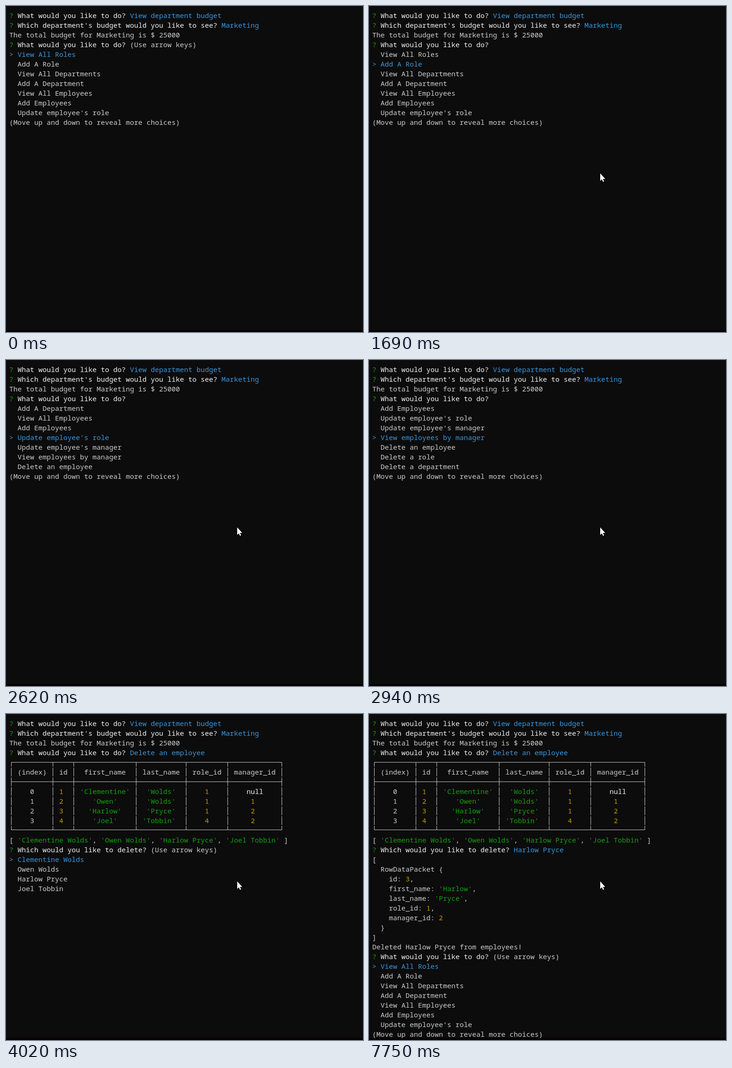
Recreate the animation shown at these times as an HTML page. Size 772 by 705 pixels, loop 8 s.

```html
<!DOCTYPE html>
<html lang="en">
<head>
<meta charset="utf-8">
<title>Terminal menu</title>
<style>
  html, body { margin: 0; width: 100%; height: 100%; overflow: hidden; background: #0c0c0c; }
  #stage { position: relative; width: 772px; height: 705px; overflow: hidden; background: #0c0c0c; }
  #stage::after { content: ""; position: absolute; left: 0; top: 701px; width: 100%; height: 4px; background: #050102; }
  pre { position: absolute; left: 7px; top: 10px; margin: 0; color: #ccc;
        font: 15px/21px "Noto Sans Mono", "DejaVu Sans Mono", monospace; font-variant-ligatures: none; }
  i { font-style: normal; }
  .w { color: #f2f2f2; } .g { color: #13a10e; } .b { color: #3a96dd; } .y { color: #c19c00; }
  svg { position: absolute; left: 0; top: 0; }
</style>
</head>
<body>
<div id="stage">
  <pre id="text"></pre>
  <svg width="772" height="705">
    <path id="grid" fill="none" stroke="#ccc"/>
    <path id="mouse" fill="#fff" d="M0 0V16.2L3.6 12.8L6 18.2L8.3 17.2L5.9 12H10.8Z"/>
  </svg>
</div>
<script>
const LOOP = 8000;
const $ = id => document.getElementById(id);
const paint = cls => s => `<i class="${cls}">${s}</i>`;
const white = paint('w'), green = paint('g'), blue = paint('b'), gold = paint('y');
const quote = s => green(`'${s}'`);

const MENU = ['View All Roles', 'Add A Role', 'View All Departments', 'Add A Department',
  'View All Employees', 'Add Employees', "Update employee's role", "Update employee's manager",
  'View employees by manager', 'Delete an employee', 'Delete a role', 'Delete a department',
  'View department budget'];
const STAFF = [['Clementine', 'Wolds', 1, null], ['Owen', 'Wolds', 1, 1],
  ['Harlow', 'Pryce', 1, 2], ['Joel', 'Tobbin', 4, 2]];
const NAMES = STAFF.map(p => p[0] + ' ' + p[1]);
const WIDTHS = [9, 4, 14, 11, 9, 12];

const ask = (q, answer = '') => `${green('?')} ${white(q)} ${answer}`;
const HINT = '(Use arrow keys)';
const TODO = 'What would you like to do?', WHICH = 'Which would you like to delete?';

const list = (items, sel) => items.map((s, i) => i === sel ? blue('&gt; ' + s) : '  ' + s);
const menu = sel => {
  const top = Math.max(0, sel - 3);
  return [...list(MENU.slice(top, top + 7), sel - top), '(Move up and down to reveal more choices)'];
};

// Table text; the rules are drawn as a path
const centre = (s, width, color) => {
  const gap = width - s.length, left = gap >> 1;
  return ' '.repeat(left) + color(s) + ' '.repeat(gap - left);
};
const plain = s => s;
const row = (cells, colors) =>
  ' ' + cells.map((s, i) => centre(s, WIDTHS[i], colors[i])).join(' ');
const table = [
  '',
  row(['(index)', 'id', 'first_name', 'last_name', 'role_id', 'manager_id'], WIDTHS.map(() => plain)),
  '',
  ...STAFF.map(([first, last, role, boss], i) => row(
    [`${i}`, `${i + 1}`, `'${first}'`, `'${last}'`, `${role}`, `${boss}`],
    [plain, gold, green, green, gold, boss === null ? white : gold])),
  ''
];

const gridPath = () => {
  const cols = [0];
  WIDTHS.forEach(w => cols.push(cols[cols.length - 1] + w + 1));
  const xs = cols.map(c => 11.5 + 9 * c), last = xs[xs.length - 1];
  let d = '';
  for (const y of [104.5, 146.5, 251.5 - 1]) d += `M${xs[0] - .5} ${y}H${last + .5}`;
  for (let r = 0; r < 8; r++) {
    const y = 95 + 21 * r;
    for (const x of xs) d += `M${x} ${r ? y : y + 9}V${r < 7 ? y + 19 : y + 9}`;
  }
  return d;
};
$('grid').setAttribute('d', gridPath());

const head = [
  ask(TODO, blue('View department budget')),
  ask("Which department's budget would you like to see?", blue('Marketing')),
  'The total budget for Marketing is $ 25000'
];
const browse = (sel, hint) => [...head, ask(TODO, hint), ...menu(sel)];
const report = [...head, ask(TODO, blue('Delete an employee')), ...table,
  `[ ${NAMES.map(quote).join(', ')} ]`];
const pick = (sel, hint) => [...report, ask(WHICH, hint), ...list(NAMES, sel)];

const removed = () => {
  const [first, last, role, boss] = STAFF[2];
  return [...report, ask(WHICH, blue(NAMES[2])),
    '[', '  RowDataPacket {',
    `    id: ${gold(3)},`,
    `    first_name: ${quote(first)},`,
    `    last_name: ${quote(last)},`,
    `    role_id: ${gold(role)},`,
    `    manager_id: ${gold(boss)}`,
    '  }', ']',
    `Deleted ${NAMES[2]} from employees!`,
    ask(TODO, HINT), ...menu(0)];
};

const screens = [
  [0, browse(0, HINT)],
  ...[1690, 1920, 2070, 2240, 2470, 2620, 2770, 2940, 3410].map((t, i) => [t, browse(i + 1)]),
  [4020, pick(0, HINT)], [4950, pick(1)], [5350, pick(2)], [7750, removed()]
].map(([t, lines]) => [t, lines.join('\n')]);

const pointer = [[0, -50, -50], [70, 594, 549], [140, 536, 437], [210, 500, 363],
  [1060, 487, 349], [1140, 500, 362]];

const at = (steps, t) => steps.filter(s => s[0] <= t).pop();
let shown;
const start = performance.now();
function draw() {
  const t = (performance.now() - start) % LOOP;
  const screen = at(screens, t);
  if (screen !== shown) {
    shown = screen;
    $('text').innerHTML = screen[1];
    $('grid').style.display = screen[0] < 4020 ? 'none' : '';
  }
  const [, x, y] = at(pointer, t);
  $('mouse').setAttribute('transform', `translate(${x} ${y})`);
  requestAnimationFrame(draw);
}
draw();
</script>
</body>
</html>
```
